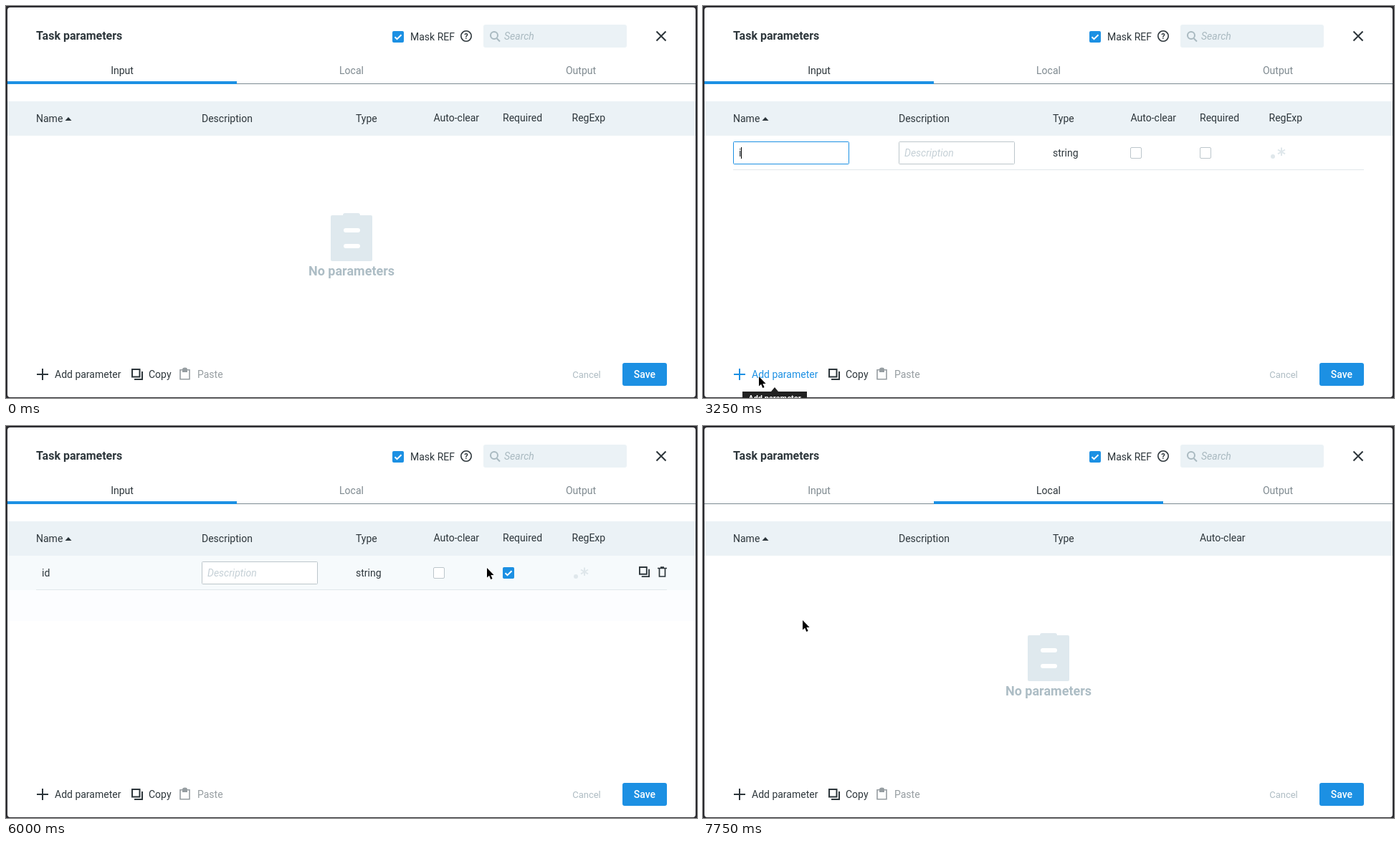
Write an HTML page that moves like this. It is 964 by 547 pixels and loops after 8000 ms.

```html
<!DOCTYPE html>
<html lang="en">
<head>
<meta charset="utf-8">
<title>Task parameters</title>
<style>
  html, body { margin: 0; width: 100%; height: 100%; overflow: hidden; background: #2b2b2f; }
  svg { display: block; width: 964px; height: 547px; font: 14px Roboto, sans-serif; fill: #2d363b; }
  .bold { font-weight: 700; }
  .mid { text-anchor: middle; }
  .hint { font-style: italic; }
  .blue { fill: #1c90e3; }
  .tint { fill: #ebf2f6; }
  .line { fill: none; stroke: #2d363b; stroke-width: 2; }
  .box { fill: #fff; stroke: #bcc6cb; }
  .tab { fill: #7f8a90; }
  .tab.on { fill: #2d363b; }
  #add.hover { fill: #1c90e3; }
  #add.hover .line { stroke: #1c90e3; }
  .off { display: none; }
</style>
</head>
<body>
<svg viewBox="0 0 964 547">
  <defs>
    <g id="tick">
      <rect class="blue" width="16" height="16" rx="2"/>
      <path d="M3.5 8.2l3 3 6-6" fill="none" stroke="#fff" stroke-width="2"/>
    </g>
    <path id="copy" class="line" d="M1 1h10.5v10.5H1zM15 4v11H4"/>
  </defs>

  <rect x="2" y="2" width="960" height="544" rx="4" fill="#fff"/>

  <!-- Title bar -->
  <text x="42" y="47" class="bold" font-size="16">Task parameters</text>
  <use href="#tick" x="539" y="35"/>
  <text x="564" y="48">Mask REF</text>
  <circle cx="642" cy="42" r="7.2" class="line" style="stroke-width:1.6"/>
  <text x="642" y="46" class="mid bold" font-size="11">?</text>
  <rect x="666" y="26" width="200" height="32" rx="3" class="tint"/>
  <path d="M685 45.5l4 4M686 41a5 5 0 1 1-10 0a5 5 0 1 1 10 0" class="line" style="stroke:#a9b9c0"/>
  <text x="695" y="47" class="hint" fill="#a9b9c0">Search</text>
  <path d="M907.5 35.5l13 13m0-13l-13 13" class="line"/>

  <!-- Tabs -->
  <text id="input" x="162" y="95" class="tab mid">Input</text>
  <text id="local" x="482" y="95" class="tab mid">Local</text>
  <text x="802" y="95" class="tab mid">Output</text>
  <rect x="2" y="108" width="960" height="1" fill="#7d8b92"/>
  <rect id="bar" y="105" height="4" class="blue"/>

  <!-- Table head -->
  <rect x="2" y="133" width="960" height="48" class="tint"/>
  <text x="42" y="162">Name</text>
  <path d="M82.5 160l4.5-5 4.5 5z"/>
  <text x="273" y="162">Description</text>
  <text x="488" y="162">Type</text>
  <text id="clear" y="161">Auto-clear</text>
  <g id="inputHead">
    <text x="693" y="161">Required</text>
    <text x="789.5" y="161">RegExp</text>
  </g>

  <g id="empty">
    <rect x="453" y="292" width="58" height="64" rx="2" fill="#dfe9ee"/>
    <rect x="470" y="289" width="24" height="8" rx="3" fill="#dfe9ee"/>
    <path d="M474 313h17M474 335h17" stroke="#fff" stroke-width="6" stroke-linecap="round"/>
    <text x="482" y="376" class="mid bold" font-size="18" fill="#adbdc5">No parameters</text>
  </g>

  <g id="row">
    <rect id="band" x="2" y="229" width="960" height="43" fill="#fcfdff"/>
    <rect id="rowHover" x="2" y="181" width="960" height="48" fill="#f6fafc"/>
    <rect x="42" y="228" width="880" height="1" fill="#e1e8eb"/>
    <rect id="field" x="42.5" y="189.5" width="161" height="31" rx="1" class="box" style="stroke:#1c90e3"/>
    <text id="name" x="50" y="210"></text>
    <rect id="caret" y="197" width="1" height="16" fill="#000"/>
    <rect x="273.5" y="189.5" width="161" height="31" rx="1" class="box"/>
    <text x="281" y="210" class="hint" fill="#c5d0d6">Description</text>
    <text x="488" y="210">string</text>
    <rect x="596.5" y="197.5" width="15" height="15" rx="1.5" class="box"/>
    <rect x="693.5" y="197.5" width="15" height="15" rx="1.5" class="box"/>
    <use id="required" href="#tick" x="693" y="197"/>
    <circle cx="795" cy="210" r="3" fill="#dfe7eb"/>
    <path d="M807 197.5v11.5M802 200.5l10 5.8m0-5.8l-10 5.8" class="line" style="stroke:#dfe7eb"/>
    <g id="actions">
      <use href="#copy" transform="translate(883 196) scale(.94)"/>
      <path d="M909 198.5h13M913 197.2h5M911.5 199v11h8v-11" class="line" style="stroke-width:1.7"/>
    </g>
  </g>

  <!-- Footer -->
  <g id="add">
    <path d="M43 514h16M51 506v16" class="line"/>
    <text x="68" y="519">Add parameter</text>
  </g>
  <use href="#copy" x="175" y="506"/>
  <text x="199" y="519">Copy</text>
  <path d="M243 507.8h13v13h-13z" class="line" style="stroke:#969da1;stroke-width:1.6"/>
  <path d="M246 507a3.5 2.5 0 0 1 7 0v4h-7z" fill="#969da1"/>
  <text x="267" y="519" fill="#969da1">Paste</text>
  <text x="810" y="519" class="mid" font-size="13" fill="#aebcc3">Cancel</text>
  <rect x="860" y="498" width="62" height="32" rx="3" class="blue"/>
  <text x="891" y="519" class="mid" font-weight="500" fill="#fff">Save</text>

  <g id="tip">
    <path d="M55 538h40l5-6 5 6h40v9H55z" fill="#212121"/>
    <text x="100" y="551" class="mid bold" font-size="11" fill="#fff">Add parameter</text>
  </g>

  <path id="cursor" d="M0 0v13.6l3.1-2.9 2.2 5.2 2.3-1-2.2-5h4.2z"
        fill="#000" stroke="#fff" stroke-width="1.2" paint-order="stroke"/>
</svg>

<script>
const LOOP = 8000, STEP = 250;
const $ = id => document.getElementById(id);
const show = (id, on) => $(id).classList.toggle('off', !on);

// Pointer stops: time, x, y
const stops = [
  [500, 668, 185], [1500, 68, 511], [1750, 78, 512], [2000, 78, 512], [2250, 78, 517],
  [3500, 78, 517], [4250, 576, 276], [4500, 696, 252], [4750, 702, 222], [5000, 701, 206],
  [5750, 701, 206], [6000, 671, 198], [6500, 551, 96], [6750, 551, 96], [7750, 139, 271]
];

function pointerAt(t) {
  const next = stops.findIndex(s => s[0] > t);
  if (next < 0) return stops[stops.length - 1].slice(1);
  const [t0, x0, y0] = stops[next - 1], [t1, x1, y1] = stops[next];
  const p = (t - t0) / (t1 - t0), e = p * p * (3 - 2 * p);
  return [x0 + (x1 - x0) * e, y0 + (y1 - y0) * e];
}

function draw(time) {
  const t = Math.floor(time % LOOP / STEP) * STEP;
  const during = (from, to) => t >= from && t < to;
  const localTab = t >= 7000, focused = t < 5250;

  show('cursor', t >= 500);
  if (t >= 500) $('cursor').setAttribute('transform', `translate(${pointerAt(t)})`);

  $('input').classList.toggle('on', !localTab);
  $('local').classList.toggle('on', t >= 6500);
  $('bar').setAttribute('x', localTab ? 322 : 2);
  $('bar').setAttribute('width', during(6500, 7000) ? 640 : 320);
  $('clear').setAttribute('x', localTab ? 693 : 596.5);
  show('inputHead', !localTab);

  const hasRow = during(2250, 7000);
  show('row', hasRow);
  show('empty', !hasRow);
  const typed = t < 3250 ? '' : t < 3500 ? 'i' : 'id';
  $('name').textContent = typed;
  $('caret').setAttribute('x', [50, 53, 61][typed.length]);
  show('caret', focused && !during(2750, 3250));
  show('field', focused);
  show('required', !focused);
  show('band', t >= 4750);
  show('rowHover', during(4750, 6250));
  show('actions', during(4750, 6250));

  $('add').classList.toggle('hover', during(2000, 3750));
  show('tip', during(2250, 3750));
}

const start = performance.now();
(function tick() {
  draw(performance.now() - start);
  requestAnimationFrame(tick);
})();
</script>
</body>
</html>
```
